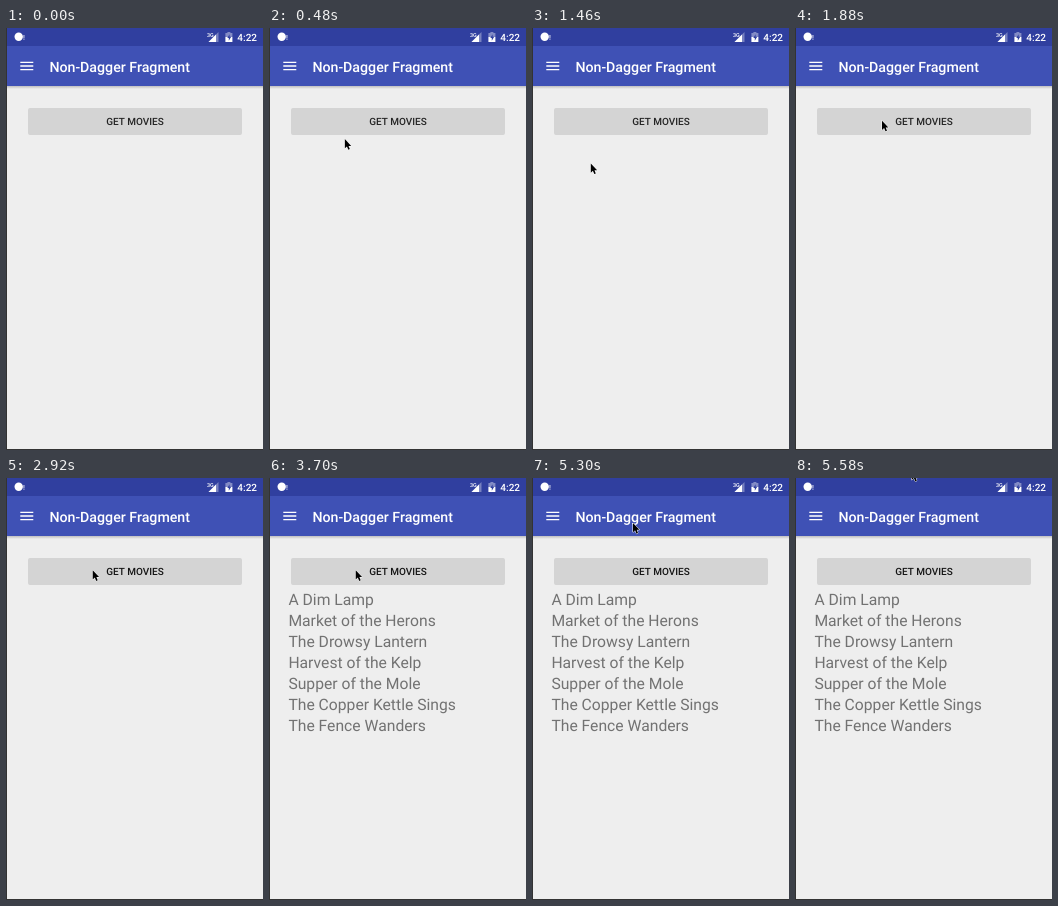
These frames come from a looping animation (257 px wide and 422 px high, 5880 ms). An HTML page:

```html
<!DOCTYPE html>
<html lang="en">
<head>
<meta charset="utf-8">
<title>Movie list</title>
<style>
  html, body { margin: 0; width: 100%; height: 100%; overflow: hidden; background: #eee; }
  svg { display: block; width: 257px; height: 422px; }
  text { font-family: Roboto, sans-serif; text-rendering: geometricPrecision; white-space: pre; }
  .medium { font-weight: 500; }
</style>
</head>
<body>
<svg viewBox="0 0 257 422">
  <defs>
    <linearGradient id="shadow" x2="0" y2="1">
      <stop offset="0" stop-opacity=".2"/>
      <stop offset="1" stop-opacity="0"/>
    </linearGradient>
  </defs>
  <rect width="257" height="422" fill="#eee"/>
  <rect y="58" width="257" height="3" fill="url(#shadow)"/>
  <rect y="17" width="257" height="41" fill="#3f51b5"/>
  <rect width="257" height="18" fill="#303f9f"/>

  <!-- Status bar -->
  <g fill="#fff">
    <circle cx="12.7" cy="8.7" r="4.2"/>
    <text class="medium" x="17" y="11.5" font-size="7">!</text>
    <text class="medium" x="201" y="8.8" font-size="5.4">3G</text>
    <path d="M212.5 4V14H202.5Z" opacity=".35"/>
    <path d="M210 6.5V14H202.5Z"/>
    <path d="M221.4 4h3v1h2v4h-7V5h2Z" opacity=".4"/>
    <path d="M219.4 9h7v5h-7Z"/>
    <path d="M223.6 6.2l-2.3 3.8h1.5v2.8l2.4-4h-1.6Z" fill="#303f9f"/>
    <text class="medium" x="231.3" y="12.8" font-size="10">4:22</text>
  </g>

  <!-- Toolbar -->
  <path d="M14.3 34.4h13M14.3 38h13M14.3 41.6h13" stroke="#fff" stroke-width="1.4"/>
  <text class="medium" x="43.4" y="43.5" font-size="14.2" fill="#fff">Non-Dagger Fragment</text>

  <!-- Button -->
  <rect x="22" y="80" width="214" height="27" rx="2" fill="#d4d4d4"/>
  <text id="label" class="medium" x="129" y="97.3" font-size="10" text-anchor="middle">GET MOVIES</text>

  <g id="list" font-size="15.7" fill="#727272"></g>
  <path d="M.5 0V422M0 421.5H257" stroke="#333"/>
  <path id="cursor" d="M0 0V9.2L2.1 7.3L3.5 10.6L5 10L3.7 6.8H6.4Z"
        fill="#000" stroke="#fff" stroke-width="1" stroke-linejoin="round" paint-order="stroke"/>
</svg>
<script>
  const LOOP = 5880, LIST_AT = 3700;
  const byId = id => document.getElementById(id);
  const label = byId('label'), list = byId('list'), cursor = byId('cursor');

  const titles = [
    'A Dim Lamp', 'Market of the Herons', 'The Drowsy Lantern', 'Harvest of the Kelp',
    'Supper of the Mole', 'The Copper Kettle Sings', 'The Fence Wanders'
  ];
  list.innerHTML = titles
    .map((title, i) => `<text x="19.4" y="${127.2 + i * 20.9}">${title}</text>`)
    .join('');

  const linear = p => p;
  const smooth = p => p * p * (3 - 2 * p);
  const easeOut = power => p => 1 - (1 - p) ** power;
  const progress = (t, start, end) => Math.min(1, Math.max(0, (t - start) / (end - start)));

  // Each leg: start time, end time, destination, easing.
  const origin = [131, -14];
  const legs = [
    [200, 480, [75.9, 111], easeOut(1.6)],
    [480, 800, [61.2, 133], easeOut(1.4)],
    [800, 880, [58.6, 135.8], linear],
    [1440, 1880, [87, 92.7], smooth],
    [2600, 2920, [86.7, 92.3], linear],
    [5040, 5580, [116.8, -7.2], smooth]
  ];

  function cursorAt(t) {
    let [x, y] = origin;
    for (const [start, end, [toX, toY], ease] of legs) {
      const p = ease(progress(t, start, end));
      x += (toX - x) * p;
      y += (toY - y) * p;
    }
    return [x, y];
  }

  function draw(now) {
    const t = now % LOOP;
    const shade = 36 - 16 * progress(t, 2600, 2920);
    label.setAttribute('fill', `rgb(${shade} ${shade} ${shade})`);
    list.setAttribute('visibility', t >= LIST_AT ? 'visible' : 'hidden');
    cursor.setAttribute('transform', `translate(${cursorAt(t)})`);
  }

  const began = performance.now();
  function tick() {
    draw(performance.now() - began);
    requestAnimationFrame(tick);
  }
  tick();
</script>
</body>
</html>
```
